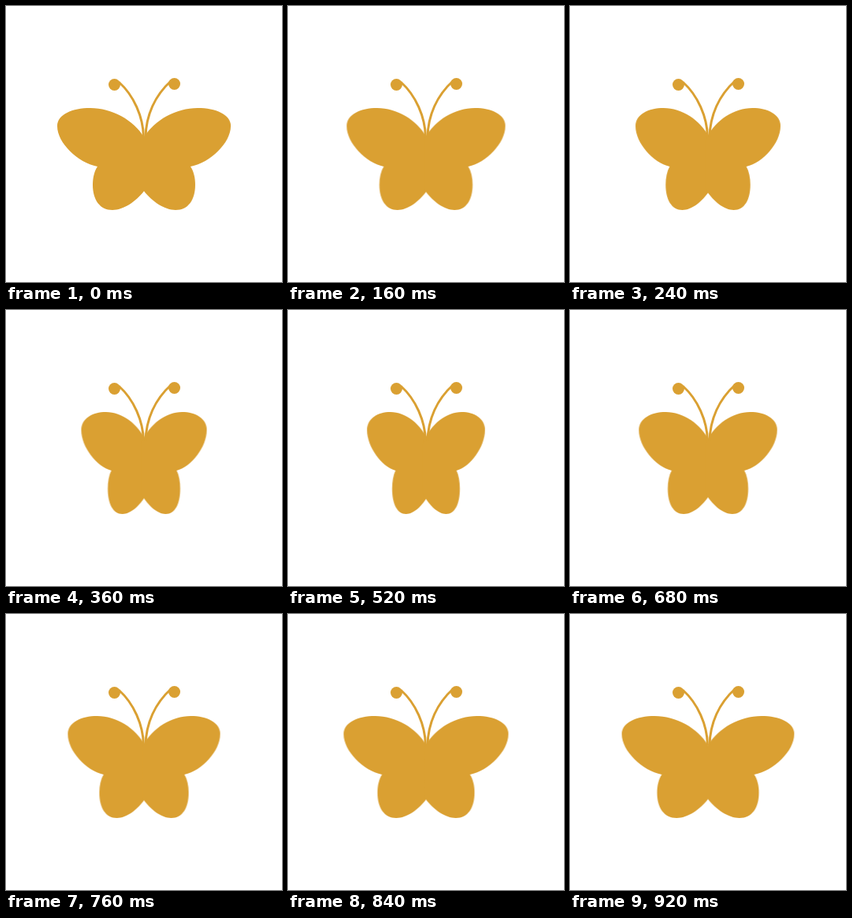
Recreate the animation shown at these times as an HTML page. Size 350 by 349 pixels, loop 960 ms.

```html
<!DOCTYPE html>
<html lang="en">
<head>
<meta charset="utf-8">
<title>Butterfly</title>
<style>
  html, body { margin: 0; width: 100%; height: 100%; overflow: hidden; background: #fff; }
  svg { display: block; width: 100%; height: 100%; fill: #daa032; }
  .feeler { fill: none; stroke: #daa032; stroke-width: 3; }

  /* The hinge sits just past the middle, so folded wings overlap more. */
  .wing {
    transform-origin: 185px 0;
    animation: flap 960ms cubic-bezier(.333, 0, .667, 1) infinite;
  }
  @keyframes flap {
    0%, 100% { transform: scaleX(1); }
    50% { transform: scaleX(.7); }
  }
</style>
</head>
<body>
<svg viewBox="0 0 350 349">
  <defs>
    <path id="wing" d="M175 166 C162 144 134 129 107 129 C84 129 65 137 65 152
      C65 173 91 198 116 203 C112 209 110 217 110 226 C110 245 119 258 135 258
      C149 258 165 247 175 234 L177 231 V169 Z"/>
  </defs>

  <use class="wing" href="#wing"/>
  <g transform="translate(350) scale(-1 1)">
    <use class="wing" href="#wing"/>
  </g>

  <path class="feeler" d="M143 96 C162 113 174 140 174.5 166"/>
  <path class="feeler" d="M209 95 C189 113 177.5 138 177 166"/>
  <circle cx="137.5" cy="99.5" r="7.5"/>
  <circle cx="213.5" cy="98.5" r="7.5"/>
</svg>
</body>
</html>
```
